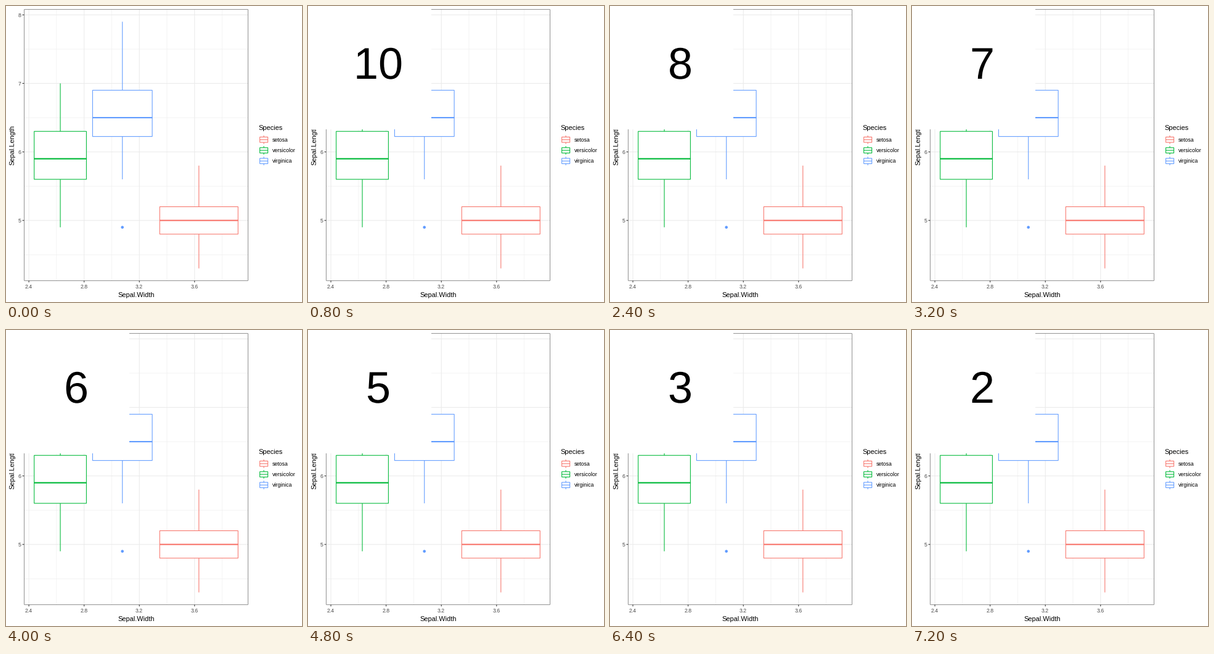
A matplotlib script that plays this animation: 480 by 480 pixels, repeating every 8 s.

```python
import matplotlib.pyplot as plt
from matplotlib.animation import FuncAnimation
from matplotlib.patches import Circle, PathPatch, Rectangle
from matplotlib.textpath import TextPath
from matplotlib.transforms import Affine2D

SIZE, DPI = 480, 96
PT = 72 / DPI  # points per pixel
FONT = "Liberation Sans"
LINE = 1.07
LEFT, RIGHT, TOP, BOTTOM = 29.3, 392.7, 5.5, 445.5
GRID, DARK, LABEL = "#ebebeb", "#333333", "#4d4d4d"

fig = plt.figure(figsize=(SIZE / DPI, SIZE / DPI), dpi=DPI, facecolor="white")
ax = fig.add_axes([0, 0, 1, 1])
ax.set_xlim(0, SIZE)
ax.set_ylim(SIZE, 0)
ax.axis("off")


def px(v):
    return 37.1 + (v - 2.4) * 223.9


def py(v):
    return TOP + (8.08 - v) * (BOTTOM - TOP) / 3.96


def line(x0, y0, x1, y1, color, width=LINE):
    ax.plot([x0, x1], [y0, y1], color=color, lw=width * PT,
            solid_capstyle="butt", snap=False)


def rect(x0, y0, x1, y1, color, width=LINE, fill="white"):
    ax.add_patch(Rectangle((x0, y0), x1 - x0, y1 - y0, facecolor=fill,
                           edgecolor=color, lw=width * PT, snap=False,
                           joinstyle="miter", zorder=2))


def text(x, y, s, size, color="black", ha="left", **kw):
    ax.text(x, y, s, fontsize=size * PT, family=FONT, color=color,
            ha=ha, va="baseline", **kw)


def box(x0, x1, stats, color, median_width):
    """Box from pixel rows: low whisker, lower, middle, upper, high whisker."""
    low, q1, mid, q3, high = stats
    center = (x0 + x1) / 2
    line(center, q3, center, high, color)
    line(center, q1, center, low, color)
    rect(x0, q3, x1, q1, color)
    line(x0, mid, x1, mid, color, median_width)


# Panel: minor grid, major grid, ticks and labels
for k in range(4):
    x, y = px(2.6 + 0.4 * k), py(4.5 + k)
    line(x, TOP, x, BOTTOM, GRID, LINE / 2)
    line(LEFT, y, RIGHT, y, GRID, LINE / 2)
for k in range(4):
    vx, vy = 2.4 + 0.4 * k, 5 + k
    x, y = px(vx), py(vy)
    line(x, TOP, x, BOTTOM, GRID)
    line(LEFT, y, RIGHT, y, GRID)
    line(x, BOTTOM, x, BOTTOM + 2.75, DARK)
    line(LEFT - 2.75, y, LEFT, y, DARK)
    text(x, 458, f"{vx:.1f}", 8.8, LABEL, "center")
    text(24.3, round(y + 3.2), str(vy), 8.8, LABEL, "right")

text(211, 472, "Sepal.Width", 11, ha="center")
text(13, 225.5, "Sepal.Length", 11, ha="center",
     rotation=90, rotation_mode="anchor")

# Name, colour, left, right, five-number summary
species = [
    ("setosa", "#F8766D", 249.3, 376.3, (4.3, 4.8, 5.0, 5.2, 5.8)),
    ("versicolor", "#00BA38", 45.7, 130.4, (4.9, 5.6, 5.9, 6.3, 7.0)),
    ("virginica", "#619CFF", 140.4, 237.1, (5.6, 6.225, 6.5, 6.9, 7.9)),
]

text(409, 201, "Species", 11)
for k, (name, color, x0, x1, stats) in enumerate(species):
    box(x0, x1, [py(v) for v in stats], color, 2 * LINE)
    cy = 216.8 + 17.28 * k
    key = [cy + d for d in (6.91, 4.32, 0, -4.32, -6.91)]
    box(411.6, 424.6, key, color, LINE)
    text(432, round(cy + 3.1), name, 8.8)
ax.add_patch(Circle((188.7, py(4.9)), 2.3, color="#619CFF", lw=0, zorder=3))

# Only the inner half of the border shows
inset = LINE / 4
rect(LEFT + inset, TOP + inset, RIGHT - inset, BOTTOM - inset,
     DARK, LINE / 2, "none")

# Countdown card
card = Rectangle((0, 0), 200, 200, facecolor="white", lw=0, zorder=10)
ax.add_patch(card)


def number_path(n):
    s = str(n)
    path = TextPath((0, 0), s, size=72, prop={"family": FONT})
    return Affine2D().scale(1, -1).translate(114 - 20 * len(s), 118).transform_path(path)


digits = PathPatch(number_path(10), facecolor="black", lw=0, zorder=11)
ax.add_patch(digits)


def update(i):
    card.set_visible(i > 0)
    digits.set_visible(i > 0)
    if i > 0:
        digits.set_path(number_path(11 - i))
    return card, digits


anim = FuncAnimation(fig, update, frames=10, interval=800,
                     repeat=True, repeat_delay=0, blit=False)
plt.show()
```
